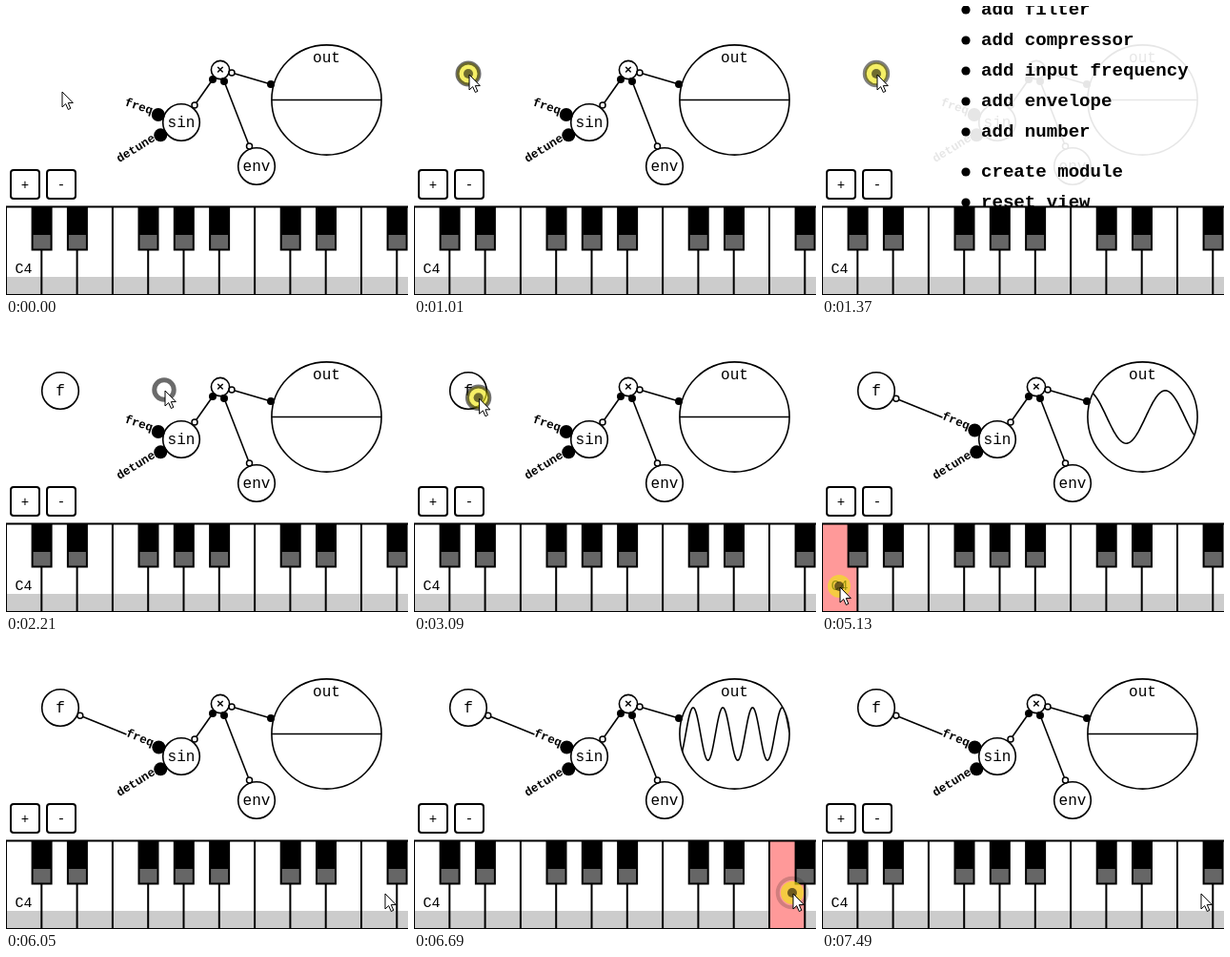
Animation, 422 px wide and 303 px high, one loop 7690 ms. Source, as an HTML page with a canvas:

```html
<!DOCTYPE html>
<html lang="en">
<head>
<meta charset="utf-8">
<title>Modular synth</title>
<style>
html, body { margin: 0; width: 422px; height: 303px; overflow: hidden; background: #fff; }
canvas { display: block; }
</style>
</head>
<body>
<canvas id="stage" width="422" height="303"></canvas>
<script>
const g = document.getElementById('stage').getContext('2d');
const LOOP = 7690, TAU = Math.PI * 2;
const MONO = '"Courier New", "Liberation Mono", monospace';
const SIN = { x: 184, y: 122 }, FREQ = { x: 57, y: 71 }, OUT = { x: 336.5, y: 98.5 };

// Pointer tip: time, x, y
const path = [
  [530, 59, 90], [780, 58, 72], [1430, 58, 72], [1700, 115, 114], [1950, 167, 71],
  [2300, 167, 71], [2750, 53, 74], [3000, 53, 74], [3380, 161, 110], [3900, 161, 110],
  [4450, 19, 277], [5380, 19, 277], [5850, 404, 260], [6000, 398, 266]
];
const presses = [[826, 1410], [2070, 2130], [2900, 3420], [4790, 5340], [6060, 6940]];
// Played notes: press, release, white key, pitch, time and place of a crest, wavelength
const notes = [
  { on: 4790, off: 5340, key: 0, hz: 261.63, at: 5130, crest: 360.3, wave: 82 },
  { on: 6060, off: 6940, key: 10, hz: 698.46, at: 6690, crest: 293, wave: 31.2 }
];
const menu = [
  ['add filter', 4], ['add compressor', 36], ['add input frequency', 68], ['add envelope', 100],
  ['add number', 132], ['create module', 174], ['reset view', 206]
];

const clamp = v => Math.max(0, Math.min(1, v));
const smooth = v => (v = clamp(v), v * v * (3 - 2 * v));
const mix = (a, b, k) => a + (b - a) * k;
const polar = (o, r, a) => ({ x: o.x + r * Math.cos(a), y: o.y + r * Math.sin(a) });

function box(x, y, w, h, color) {
  g.fillStyle = color;
  g.fillRect(x, y, w, h);
}

function disc(p, r, fill, stroke, width = 1.6) {
  g.beginPath();
  g.arc(p.x, p.y, r, 0, TAU);
  if (fill) { g.fillStyle = fill; g.fill(); }
  if (stroke) { g.strokeStyle = stroke; g.lineWidth = width; g.stroke(); }
}

function text(s, x, y, size = 16, align = 'center', weight = '') {
  g.font = `${weight} ${size}px ${MONO}`;
  g.textAlign = align;
  g.textBaseline = 'alphabetic';
  g.fillStyle = '#000';
  g.fillText(s, x, y);
}

function wire(a, b, c = { x: (a.x + b.x) / 2, y: (a.y + b.y) / 2 }) {
  g.beginPath();
  g.moveTo(a.x, a.y);
  g.quadraticCurveTo(c.x, c.y, b.x, b.y);
  g.strokeStyle = '#000';
  g.lineWidth = 1.6;
  g.stroke();
}

function node(label, p, r = 19.3) {
  disc(p, r, '#fff', '#000');
  text(label, p.x, p.y + 4.5);
}

const outlet = p => disc(p, 3, '#fff', '#000', 1.5);
const inlet = (p, r = 4) => disc(p, r, '#000');

function input(label, angle) {
  inlet(polar(SIN, 25.5, Math.PI + angle), 7);
  g.save();
  g.translate(SIN.x, SIN.y);
  g.rotate(angle);
  text(label, -32.5, 2, 12.5, 'right', 'bold');
  g.restore();
}

function pointer(t) {
  let a = path[0];
  for (const b of path) {
    if (t < b[0]) {
      const k = smooth((t - a[0]) / (b[0] - a[0]));
      return { x: mix(a[1], b[1], k), y: mix(a[2], b[2], k) };
    }
    a = b;
  }
  return { x: a[1], y: a[2] };
}

function level(t, n) {
  if (t < n.on) return 0;
  const attack = clamp((t - n.on) / 80);
  const peak = mix(35, 27.7, clamp((t - n.on - 80) / 160));
  return attack * peak * (1 - clamp((t - n.off) / 320));
}

function scope(t) {
  disc(OUT, 57.6, '#fff', '#000');
  const tick = Math.floor((t - 10) / 40) * 40 + 10;
  const left = 279, right = 394;
  g.save();
  g.beginPath();
  g.arc(OUT.x, OUT.y, 57.6, 0, TAU);
  g.clip();
  g.beginPath();
  for (let x = left; x <= right; x++) {
    let y = OUT.y;
    for (const n of notes) {
      const phase = (x - n.crest) / n.wave + n.hz * (tick - n.at) / 1000;
      y -= level(tick, n) * Math.cos(TAU * phase);
    }
    g.lineTo(x, y);
  }
  g.lineWidth = 1.6;
  g.strokeStyle = '#000';
  g.stroke();
  g.restore();
  text('out', OUT.x, 59);
}

function patch(t, tip) {
  const settle = smooth((t - 3870) / 260);
  const angle = mix(0.322, Math.atan2(SIN.y - FREQ.y, SIN.x - FREQ.x), settle);

  if (t >= 3000) {
    const dragging = t < 3420;
    const aim = dragging ? Math.atan2(tip.y - FREQ.y, tip.x - FREQ.x) : angle;
    const start = polar(FREQ, 22.4, aim);
    const end = dragging ? tip : polar(SIN, 62, Math.PI + angle);
    const far = Math.hypot(tip.x - FREQ.x, tip.y - FREQ.y) > 24;
    if (!dragging || far) {
      const sag = dragging ? 0 : 4 * (1 - settle);
      wire(start, end, { x: (start.x + end.x) / 2, y: (start.y + end.y) / 2 + sag });
      outlet(start);
    }
  }
  if (t >= 2130) node('f', FREQ);

  const ends = [[198, 104, 217, 77], [255.5, 147, 229, 79], [237, 70, 278, 82]];
  scope(t);
  node('sin', SIN);
  node('env', { x: 263, y: 168 });
  disc({ x: 225, y: 67 }, 9.6, '#fff', '#000');
  text('×', 225, 71, 13, 'center', 'bold');
  for (const [x1, y1, x2, y2] of ends) {
    const a = { x: x1, y: y1 }, b = { x: x2, y: y2 };
    wire(a, b);
    outlet(a);
    inlet(b);
  }
  input('freq', angle);
  input('detune', -0.55);
}

function drawMenu(t) {
  if (t < 1210 || t >= 2130) return;
  box(0, 0, 422, 210, 'rgba(255,255,255,.9)');
  if (t > 1890) box(167, 52, 255, 32, '#ddd');
  for (const [label, y] of menu) {
    disc({ x: 151, y }, 4.6, '#000');
    text(label, 167, y + 5, 19.1, 'left', 'bold');
  }
}

function button(x, label) {
  g.beginPath();
  g.roundRect(x, 172, 30, 30, 3);
  g.fillStyle = '#fff';
  g.fill();
  g.lineWidth = 2;
  g.strokeStyle = '#000';
  g.stroke();
  text(label, x + 15, 191.5, 14);
}

function piano(t) {
  const step = 37.3;
  box(0, 210, 422, 93, '#fff');
  box(0, 284, 422, 18, '#ccc');
  for (const n of notes) {
    if (t >= n.on && t < n.off) box(n.key * step, 210, step, 92, '#f99');
  }
  box(0, 209.5, 422, 2, '#000');
  box(0, 302, 422, 1, '#000');
  for (let i = 0; i < 12; i++) {
    const x = i * step;
    box(x - 1, 210, 2, 93, '#000');
    if ([1, 2, 4, 5, 6].includes(i % 7)) {
      box(x - 10.7, 210, 22, 46.5, '#000');
      box(x - 8.7, 240, 18, 14.5, '#666');
    }
  }
  text('C4', 9.5, 280, 15, 'left');
}

function arrow(p) {
  g.save();
  g.translate(p.x, p.y);
  g.beginPath();
  for (const [x, y] of [[0, 0], [0, 16], [3.7, 12.6], [6.3, 18.5], [8.8, 17.4], [6.3, 11.6], [11.3, 11.6]]) g.lineTo(x, y);
  g.closePath();
  g.fillStyle = '#fff';
  g.fill();
  g.lineWidth = 1;
  g.strokeStyle = '#000';
  g.stroke();
  g.restore();
}

function clicks(t, tip) {
  const p = { x: tip.x - 1, y: tip.y - 1 };
  const ring = (r, k, width) => disc(p, r, null, `rgba(0,0,0,${Math.min(0.58, 1.25 * (1 - k))})`, width);
  for (const [down, up] of presses) {
    if (t >= down && t < up) {
      const k = (t - down) % 340 / 340;
      disc(p, 12, 'rgba(240,230,20,.65)');
      disc(p, 5, 'rgba(0,0,0,.55)');
      if (k > 0.02) ring(5 + 12 * k, k, 4);
    } else if (t >= up && t < up + 250) {
      const k = (t - up) / 250;
      ring(7 + 10 * k, k, 5);
    }
  }
}

function draw(now) {
  const t = now % LOOP, tip = pointer(t);
  box(0, 0, 422, 303, '#fff');
  patch(t, tip);
  drawMenu(t);
  button(5, '+');
  button(43, '-');
  piano(t);
  clicks(t, tip);
  arrow(tip);
}

const begin = performance.now();
function frame() {
  draw(performance.now() - begin);
  requestAnimationFrame(frame);
}
frame();
</script>
</body>
</html>
```
